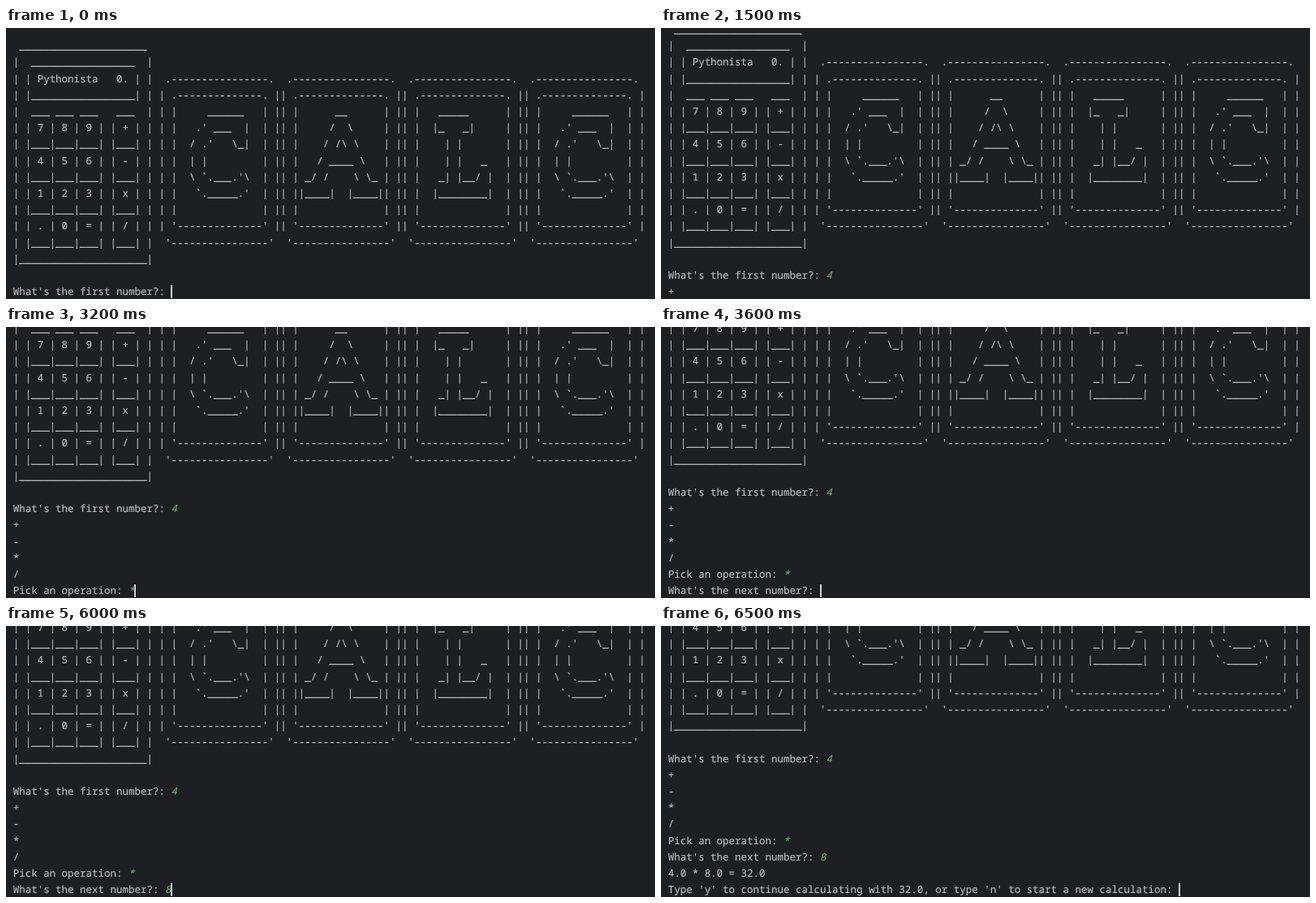
These frames come from a looping animation (800 px wide and 334 px high, 8000 ms). An HTML page:

```html
<!DOCTYPE html>
<html lang="en">
<head>
<meta charset="utf-8">
<title>Console calculator</title>
<style>
  :root { --col: 7.495px; --row: 20.2px; --x: 8.7px; }
  html, body { margin: 0; width: 100%; height: 100%; overflow: hidden; background: #1e1f22; }
  .stage { position: relative; width: 800px; height: 334px; overflow: hidden; }
  pre {
    position: absolute; left: var(--x); top: 12.1px; margin: 0;
    font: 500 12.492px/var(--row) "Noto Sans Mono", "DejaVu Sans Mono", monospace;
    font-variant-ligatures: none; text-rendering: geometricPrecision;
    color: #bcbec4; -webkit-text-stroke: .15px;
    animation: scroll 8s step-end infinite;
  }
  em { color: #6aab73; animation: 8s step-end infinite; }
  .first { animation-name: type-first; }
  .sign { animation-name: type-sign; }
  .next { animation-name: type-next; }
  /* --at: caret column */
  .caret {
    position: absolute; left: calc(var(--x) - .5px + var(--col) * var(--at)); top: 317px;
    width: 2px; height: 16px; background: #ced0d6;
    animation: caret 8s step-end infinite;
  }
  @keyframes scroll {
    0% { margin-top: 0; }
    18.75% { margin-top: calc(var(--row) * -1); }
    20% { margin-top: calc(var(--row) * -5); }
    43.75% { margin-top: calc(var(--row) * -6); }
    78.75% { margin-top: calc(var(--row) * -7); }
    80%, 100% { margin-top: calc(var(--row) * -8); }
  }
  @keyframes type-first { 0% { opacity: 0; } 5%, 100% { opacity: 1; } }
  @keyframes type-sign { 0% { opacity: 0; } 40%, 100% { opacity: 1; } }
  @keyframes type-next { 0% { opacity: 0; } 70%, 100% { opacity: 1; } }
  @keyframes caret {
    0% { --at: 26; opacity: 1; }
    5% { --at: 27; opacity: 1; }
    18.75% { --at: 0; opacity: 0; }
    20% { --at: 19; opacity: 1; }
    40% { --at: 20; opacity: 1; }
    43.75% { --at: 25; opacity: 1; }
    57.5% { --at: 25; opacity: 0; }
    70% { --at: 26; opacity: 1; }
    78.75% { --at: 0; opacity: 0; }
    80%, 100% { --at: 84; opacity: 1; }
  }
</style>
</head>
<body>
<div class="stage">
<pre>
 _____________________
|  _________________  |
| | Pythonista   0. | |  .----------------.  .----------------.  .----------------.  .----------------.
| |_________________| | | .--------------. || .--------------. || .--------------. || .--------------. |
|  ___ ___ ___   ___  | | |     ______   | || |      __      | || |   _____      | || |     ______   | |
| | 7 | 8 | 9 | | + | | | |   .' ___  |  | || |     /  \     | || |  |_   _|     | || |   .' ___  |  | |
| |___|___|___| |___| | | |  / .'   \_|  | || |    / /\ \    | || |    | |       | || |  / .'   \_|  | |
| | 4 | 5 | 6 | | - | | | |  | |         | || |   / ____ \   | || |    | |   _   | || |  | |         | |
| |___|___|___| |___| | | |  \ `.___.'\  | || | _/ /    \ \_ | || |   _| |__/ |  | || |  \ `.___.'\  | |
| | 1 | 2 | 3 | | x | | | |   `._____.'  | || ||____|  |____|| || |  |________|  | || |   `._____.'  | |
| |___|___|___| |___| | | |              | || |              | || |              | || |              | |
| | . | 0 | = | | / | | | '--------------' || '--------------' || '--------------' || '--------------' |
| |___|___|___| |___| |  '----------------'  '----------------'  '----------------'  '----------------'
|_____________________|

What's the first number?: <em class="first">4</em>
+
-
*
/
Pick an operation: <em class="sign">*</em>
What's the next number?: <em class="next">8</em>
4.0 * 8.0 = 32.0
Type 'y' to continue calculating with 32.0, or type 'n' to start a new calculation: </pre>
<div class="caret"></div>
</div>
</body>
</html>
```
